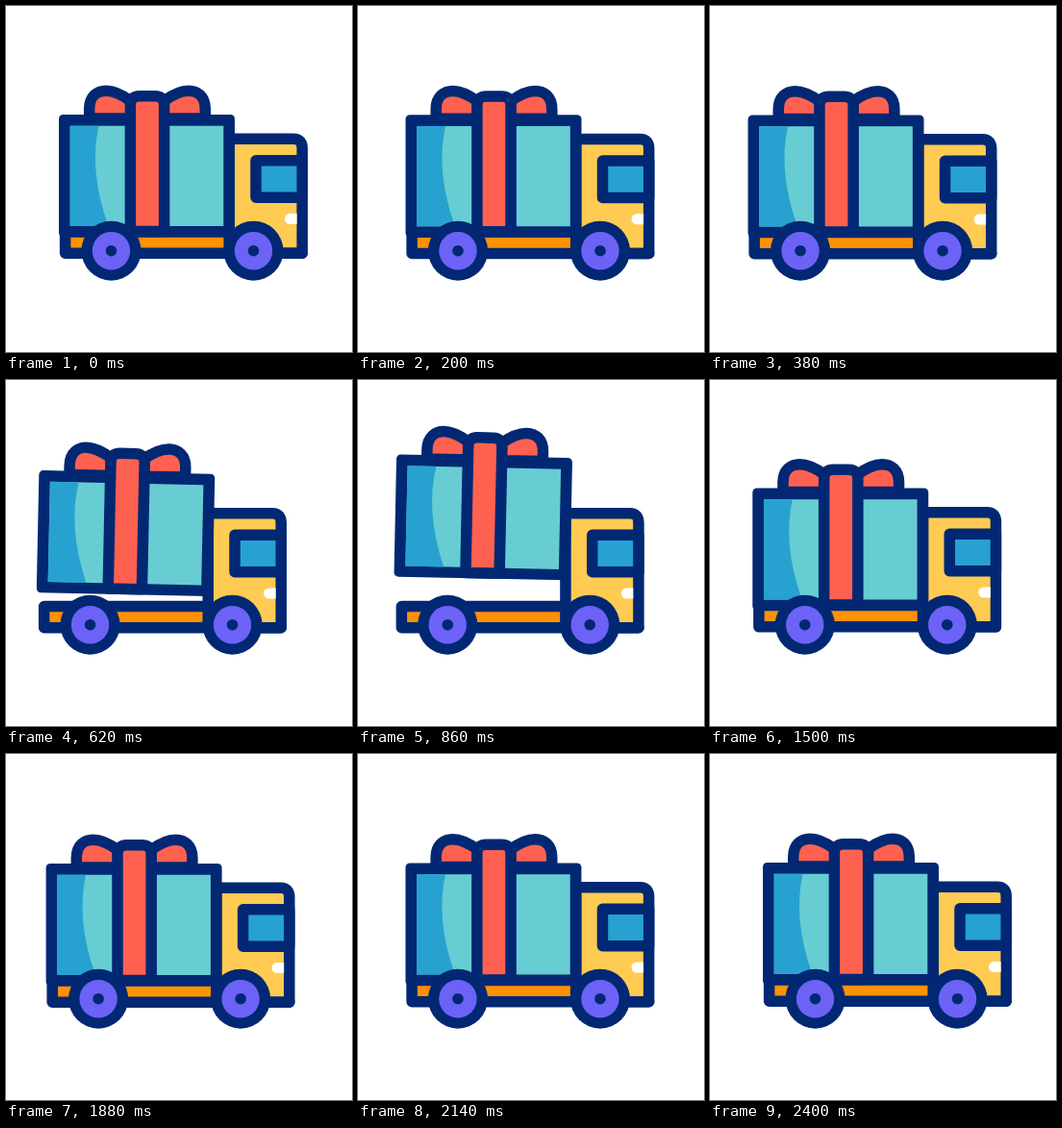
Recreate the animation shown at these times as an HTML page. Size 360 by 360 pixels, loop 2420 ms.

```html
<!DOCTYPE html>
<html lang="en">
<head>
<meta charset="utf-8">
<title>Gift delivery</title>
<style>
  html, body { margin: 0; width: 100%; height: 100%; overflow: hidden; background: #fff; }
  svg { display: block; width: 100vw; height: 100vh; }
  .line { stroke: #022873; stroke-width: 11.5; stroke-linejoin: round; stroke-linecap: round; }
  .navy { fill: #022873; }
  .red { fill: #ff6150; }
  .blue { fill: #27a2d0; }
  .teal { fill: #67cdd2; }
  .yellow { fill: #ffcb52; }
  .orange { fill: #ff9105; }
  .purple { fill: #6c63f6; }
  .none { fill: none; }
</style>
</head>
<body>
<svg viewBox="0 0 360 360">
  <defs>
    <path id="loop" class="line red" d="M86.7 117V107C86.7 94 95 88.2 104 88.2C114 88.2 122 93 130 99V117Z"/>
    <g id="wheel">
      <circle class="navy" r="31"/>
      <circle class="purple" r="19.7"/>
      <circle class="navy" r="5.8"/>
    </g>
  </defs>
  <g id="truck">
    <g id="body">
      <path class="line yellow" d="M232.2 138.2H299Q308.2 138.2 308.2 148V257.3H232.2Z"/>
      <path class="line blue" d="M308.2 160.8H260V199.2H308.2Z"/>
      <path fill="#fff" d="M302.6 216H295.5a5.5 5.5 0 0 0 0 11H302.6Z"/>
      <path class="line orange" d="M61.6 235H232.2V257.3H61.6Z"/>
      <path class="line none" d="M232 257.3H308.2"/>
      <g id="box">
        <use href="#loop"/>
        <use href="#loop" transform="matrix(-1 0 0 1 294 0)"/>
        <rect class="navy" x="55" y="113" width="183" height="127.3" rx="4.5"/>
        <rect class="teal" x="66.7" y="124.7" width="159.6" height="104.3"/>
        <path class="blue" d="M66.7 124.7H96.5Q86 172 106.5 229H66.7Z"/>
        <path class="line red" d="M129.4 234.5V103Q129.4 93.7 139 93.7H155Q164.6 93.7 164.6 103V234.5Z"/>
      </g>
    </g>
    <use href="#wheel" x="109.5" y="254.7"/>
    <use href="#wheel" x="257.5" y="254.7"/>
  </g>
</svg>
<script>
  const LOOP = 2420;
  // [time, value] steps, eased in and out between neighbours
  const drive = [[0, 0], [600, -22], [1200, -7.5], [1800, -14], [2400, 0], [LOOP, 0]];
  const bob = [[0, 0], [400, .5], [880, .5], [1110, -1], [1480, -.5], [1880, 1], [2400, 0], [LOOP, 0]];
  const tilt = [[530, 0], [690, 2], [1080, 0]];
  const hop = { start: 530, end: 1080, height: 36 };

  const [truck, body, box] = ['truck', 'body', 'box'].map(id => document.getElementById(id));

  function sample(steps, t) {
    if (t <= steps[0][0]) return steps[0][1];
    for (let i = 1; i < steps.length; i++) {
      const [t0, a] = steps[i - 1], [t1, b] = steps[i];
      if (t <= t1) return a + (b - a) * (1 - Math.cos(Math.PI * (t - t0) / (t1 - t0))) / 2;
    }
    return steps[steps.length - 1][1];
  }

  function lift(t) {
    const u = (t - hop.start) / (hop.end - hop.start);
    return u > 0 && u < 1 ? -hop.height * Math.sin(Math.PI * u) : 0;
  }

  function draw(now) {
    const t = now % LOOP;
    truck.setAttribute('transform', `translate(${sample(drive, t)} 0)`);
    body.setAttribute('transform', `translate(0 ${sample(bob, t)})`);
    box.setAttribute('transform', `translate(0 ${lift(t)}) rotate(${sample(tilt, t)} 146.5 177)`);
  }

  let start;
  function tick(now) {
    start ??= now;
    draw(now - start);
    requestAnimationFrame(tick);
  }
  draw(0);
  requestAnimationFrame(tick);
</script>
</body>
</html>
```
